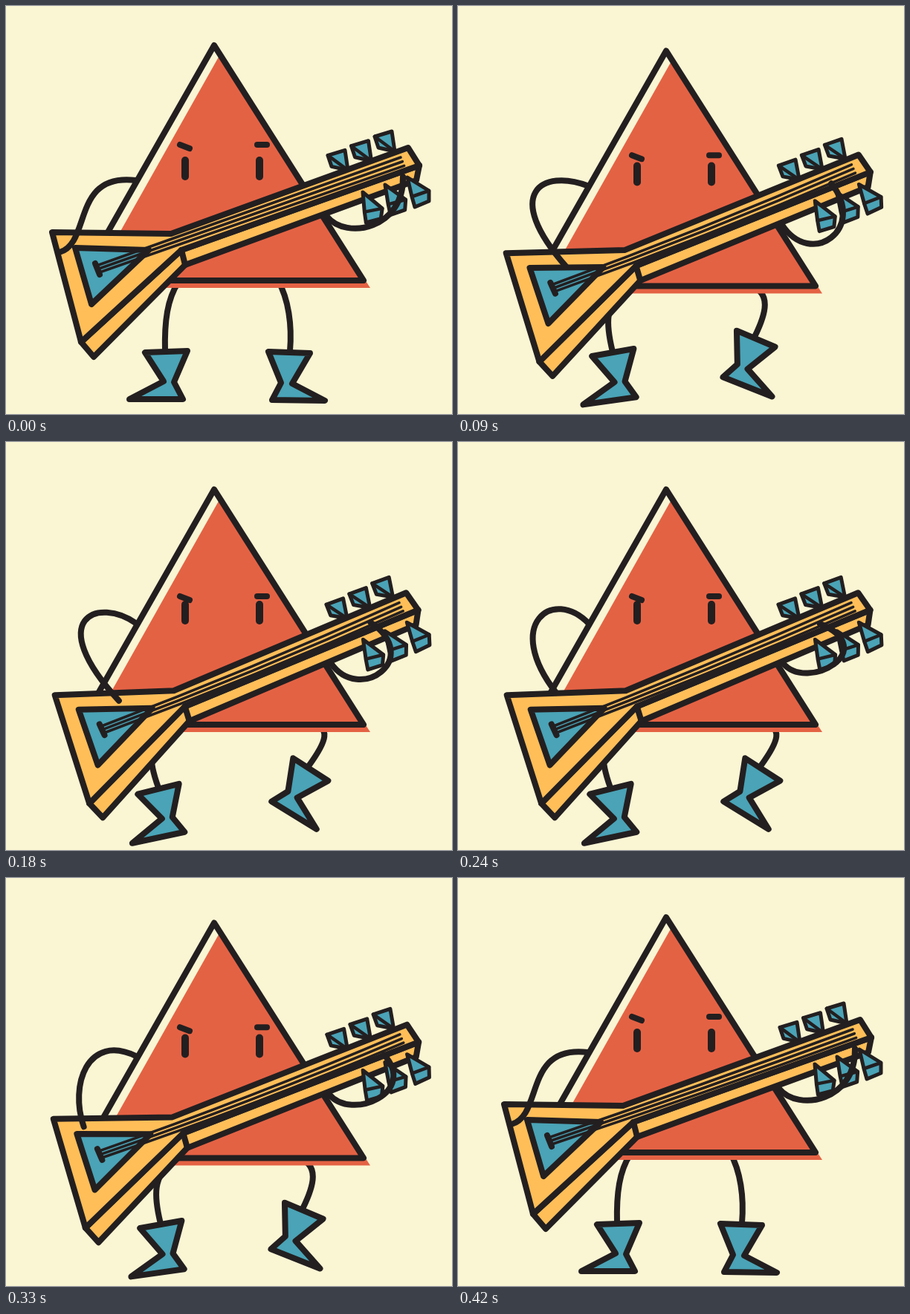
An HTML page with a canvas that plays this animation: 600 by 550 pixels, repeating every 450 ms.

```html
<!DOCTYPE html>
<html lang="en">
<head>
<meta charset="utf-8">
<title>Triangle rocker</title>
<style>
  html, body { margin: 0; width: 100%; height: 100%; overflow: hidden; background: #faf5d3; }
  canvas { display: block; width: 600px; height: 550px; }
</style>
</head>
<body>
<canvas id="stage" width="600" height="550"></canvas>
<script>
const ctx = document.getElementById('stage').getContext('2d');
const PAPER = '#faf5d3', RED = '#e46244', YELLOW = '#ffbe58', BLUE = '#4aa3b6', INK = '#231f20';
const LOOP = 450, STEP = 30, END = 420, STRUM_END = 240;
const LINE = 8;

function smooth(u) {
  const v = Math.max(0, Math.min(1, u));
  return v * v * (3 - 2 * v);
}

// Eases from 0 to 1 in `rise` ms, then back to 0 over the last `fall` ms before `end`.
const swell = (time, rise, fall, end) => smooth(Math.min(time / rise, (end - time) / fall));

const mix = (from, to, p) => from.map((v, i) => v + (to[i] - v) * p);

function ink(width) {
  ctx.strokeStyle = INK;
  ctx.lineWidth = width;
  ctx.stroke();
}

function trace(points, closed) {
  ctx.beginPath();
  for (let i = 0; i < points.length; i += 2) ctx.lineTo(points[i], points[i + 1]);
  if (closed) ctx.closePath();
}

function shape(points, fill, width) {
  trace(points, true);
  if (fill) {
    ctx.fillStyle = fill;
    ctx.fill();
  }
  if (width) ink(width);
}

function line(points, width = LINE) {
  trace(points, false);
  ink(width);
}

function curve([x, y, ...handles]) {
  ctx.beginPath();
  ctx.moveTo(x, y);
  ctx.bezierCurveTo(...handles);
  ink(LINE);
}

function turned(x, y, angle, dx, dy, draw) {
  ctx.save();
  ctx.translate(x + dx, y + dy);
  ctx.rotate(angle);
  ctx.translate(-x, -y);
  draw();
  ctx.restore();
}

function drawLegs(lift) {
  curve(mix([232,372, 217,395, 213,425, 214,465], [222,385, 188,405, 192,430, 205,466], lift));
  curve(mix([366,370, 380,395, 385,430, 382,465], [400,378, 445,380, 428,408, 407,437], lift));
  turned(219, 517, -.209 * lift, 0, 0, () =>
    shape([187,467, 244,465, 226,507, 238,530, 166,530, 212,506], BLUE, LINE));
  turned(384, 502.3, .538 * lift, 10.3 * lift, -29 * lift, () =>
    shape([353,466, 409,468, 385,509, 429,532, 358,531, 370,508], BLUE, LINE));
}

function drawBody(lift) {
  ctx.save();
  ctx.translate(0, 11 * lift);
  shape([287,67, 490,380, 111,380], RED);
  shape([280,53, 481,370, 100,370], null, LINE);
  for (const x of [241, 341]) line([x, 208, x, 230], 10);
  ctx.translate(0, 10 * lift);
  line([234,187, 247,192]);
  line([338,187, 351,187]);
  ctx.restore();
}

// Three pegs in a row, each one further down the neck and turned a little more.
function drawPegs(outline, crease, stepX, stepY, turn) {
  for (let i = 2; i >= 0; i--) {
    turned(outline[0], outline[1], turn * i, -stepX * i, stepY * i, () => {
      shape(outline, BLUE, 5);
      line(crease, 4.5);
    });
  }
}

function drawStrings(bend) {
  for (let i = 0; i < 3; i++) {
    ctx.beginPath();
    ctx.moveTo(122 + 2 * i, 350 + 4.5 * i);
    ctx.quadraticCurveTo(327 + 2 * i, 277 + 5.2 * i + 2 * bend, 531 + 2.3 * i, 204 + 5.7 * i);
    ink(3.6);
  }
}

function drawGuitar(bend) {
  drawPegs([496,176, 519,169, 523,196, 501,191], [496,176, 523,196], 31.5, 12.7, 0);
  shape([101,453, 118,473, 241,349, 552,235, 556,215, 236,329], YELLOW, LINE);
  shape([62,305, 222,307, 541,191, 556,215, 236,329, 101,453], YELLOW, LINE);
  line([236,329, 241,349]);
  shape([93,326, 192,329, 115,402], BLUE, LINE);
  line([120,347, 126,362]);
  drawStrings(bend);
  drawPegs([540,231, 569,249, 569,263, 550,271, 546,257], [546,257, 569,249], 30, 10, .07);
}

// `held` blends rest to playing; `strum` adds a short swing on top.
function drawArm(rest, playing, swing, held, strum) {
  curve(mix(rest, playing, held).map((v, i) => v + swing[i] * strum));
}

function drawScene(time) {
  const lift = swell(time, 145, 145, END);
  const held = swell(time, 130, 170, END);
  const strum = swell(time, 130, 110, STRUM_END);
  const bend = 4 * Math.sin(time / 60 * 280 * Math.PI / 180);

  ctx.fillStyle = PAPER;
  ctx.fillRect(0, 0, 600, 550);
  ctx.lineCap = ctx.lineJoin = 'round';
  drawLegs(lift);
  drawBody(lift);
  turned(781, 250, -.0507 * held, 0, 0, () => drawGuitar(bend));
  drawArm([175,235, 88,224, 115,320, 72,332], [176,245, 128,195, 60,245, 132,338],
    [0,0, -8,22, -18,-13, 35,19], held, strum);
  drawArm([432,284, 458,316, 536,300, 534,230], [437,298, 470,338, 570,280, 487,245],
    [0,0, 10,28, -15,20, 6,-3], held, strum);
}

const start = performance.now();
function tick() {
  const elapsed = (performance.now() - start) % LOOP;
  drawScene(Math.floor(elapsed / STEP) * STEP);
  requestAnimationFrame(tick);
}
tick();
</script>
</body>
</html>
```
